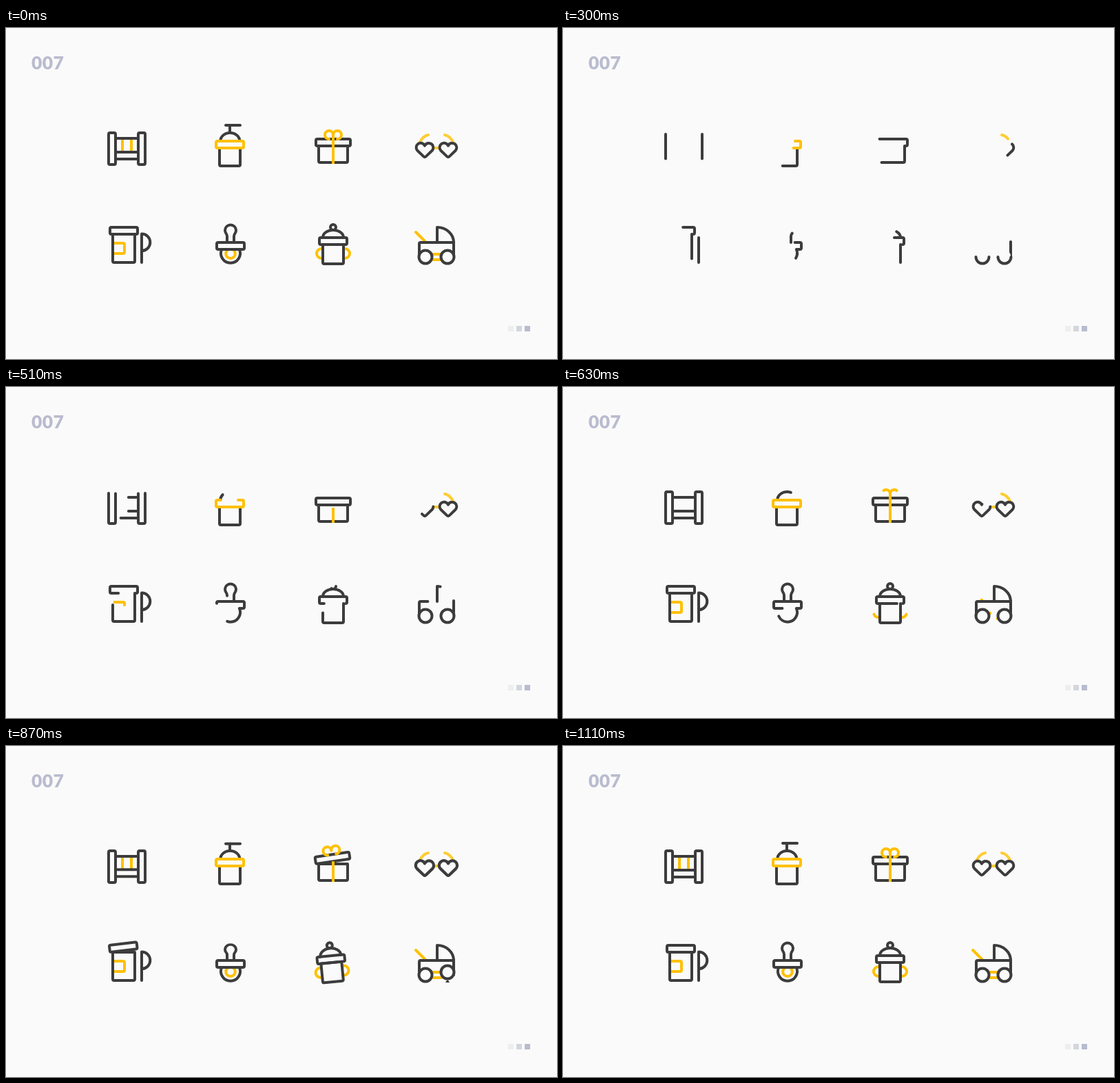
An HTML page that plays this animation: 800x480 px, repeating every 1.26 s.

```html
<!DOCTYPE html>
<html lang="en">
<head>
<meta charset="utf-8">
<title>Icon set 007</title>
<style>
  html, body { margin: 0; width: 100%; height: 100%; overflow: hidden; background: #fafafa; }
  svg { display: block; width: 100vw; height: 100vh; }
  text { font: 900 26.5px Lato, "Open Sans", sans-serif; letter-spacing: .4px; fill: #b9bccf; }
  path { fill: none; stroke-width: 4; stroke-linejoin: round; }
</style>
</head>
<body>
<svg id="stage" viewBox="0 0 800 480">
  <text x="37" y="59.5">007</text>
  <rect x="729" y="432" width="8" height="8" fill="#edeef0"/>
  <rect x="741" y="432" width="8" height="8" fill="#d3d6de"/>
  <rect x="753" y="432" width="8" height="8" fill="#b8bccf"/>
</svg>
<script>
const STEP = 30, LOOP = 1260;
const DARK = '#3c3c3d', GOLD = '#ffc000', PALE = '#ffcc33', PAPER = '#fafafa';
const stage = document.getElementById('stage');
const strokes = [];

function node(tag, parent, attrs = {}) {
  const el = document.createElementNS('http://www.w3.org/2000/svg', tag);
  for (const key in attrs) el.setAttribute(key, attrs[key]);
  return parent.appendChild(el);
}
const group = (parent = stage) => node('g', parent);

// A stroke that draws itself from step `start` over `span` steps.
function draw(parent, color, start, span, d, attrs = {}) {
  const el = node('path', parent, { d, stroke: color, pathLength: 1, ...attrs });
  strokes.push({ el, start, span, cap: attrs['stroke-linecap'] || 'round' });
  return el;
}
const mirror = axis => ({ transform: `matrix(-1 0 0 1 ${2 * axis} 0)` });
const butt = { 'stroke-linecap': 'butt' };

// Rounded box, drawn from the lower right corner upwards.
const lid = (x, y, w, h, inset = 2) =>
  `M${x + w - inset} ${y + h}H${x + w - 2}a2 2 0 0 0 2-2V${y + 2}a2 2 0 0 0-2-2H${x + 2}` +
  `a2 2 0 0 0-2 2V${y + h - 2}a2 2 0 0 0 2 2z`;

// Container, drawn from the upper right corner downwards.
const pot = (x, y, w, h) =>
  `M${x + w} ${y}V${y + h - 2}a2 2 0 0 1-2 2H${x + 2}a2 2 0 0 1-2-2V${y}z`;

const ring = (cx, cy, r) =>
  `M${cx + r} ${cy}a${r} ${r} 0 1 1 ${-2 * r} 0a${r} ${r} 0 1 1 ${2 * r} 0`;

const heart = (cx, x, y) =>
  `M${cx + x} ${y}A6.5 6.5 0 0 1 ${cx + 10.6} 177.8L${cx + 1.4} 186.6Q${cx} 187.8 ${cx - 1.4} 186.6` +
  `L${cx - 10.6} 177.8A6.5 6.5 0 1 1 ${cx} 170.6A6.5 6.5 0 0 1 ${cx + x} ${y}z`;

// Crib
const bars = [169, 182].map(x => ({ x, el: draw(stage, GOLD, 21, 5, `M${x} 160V180`, butt) }));
draw(stage, DARK, 14, 7, 'M192 160H159');
const rails = group();
draw(rails, DARK, 14, 7, 'M192 180H159');
draw(rails, DARK, 12, 6.5, 'M192 190H159');
const post = 'M149 154V196a2 2 0 0 0 2 2h6a2 2 0 0 0 2-2V154a2 2 0 0 0-2-2h-6a2 2 0 0 0-2 2z';
draw(stage, DARK, 5.83, 12.6, post);
draw(stage, DARK, 5.83, 12.6, post, mirror(175.5));

// Pump bottle
const stem = draw(stage, DARK, 22, 3, 'M325 151V141');
const head = draw(stage, DARK, 23, 3.5, 'M319 141H340');
draw(stage, DARK, 15, 9.4, 'M311.3 164a14 12 0 0 1 28 0');
draw(stage, DARK, 5.8, 10, pot(310, 174, 30, 26));
draw(stage, GOLD, 5.85, 15.2,
  'M337 164H343a2 2 0 0 1 2 2V172a2 2 0 0 1-2 2H307a2 2 0 0 1-2-2V166a2 2 0 0 1 2-2z');

// Gift
draw(stage, DARK, 5.7, 9.9, pot(454, 171, 42, 24));
const giftLid = group();
draw(giftLid, DARK, 5.7, 9.9, lid(450, 161, 50, 10));
const loop = 'M475 155a6 6 0 1 0-6 6';
draw(giftLid, GOLD, 17.5, 7.5, loop);
draw(giftLid, GOLD, 17.5, 7.5, loop, mirror(475));
const ribbon = draw(stage, GOLD, 14, 6, 'M475 197V153', butt);

// Glasses
const temple = 'M637 155Q645 156.5 650 167';
draw(stage, PALE, 5.2, 8, temple);
draw(stage, PALE, 21, 5, temple, mirror(625));
draw(stage, PALE, 13, 3, 'M631 174H619');
const lenses = [
  { cx: 608, el: draw(stage, DARK, 14, 9, heart(608, 12.3, 173.4), { style: `fill:${PAPER}` }) },
  { cx: 642, el: draw(stage, DARK, 7.5, 9, heart(642, 10, 168.4), { style: `fill:${PAPER}` }) }
];

// Jug
draw(stage, GOLD, 14, 6.5, 'M156 312H170a2 2 0 0 1 2 2V325a2 2 0 0 1-2 2H156', butt);
draw(stage, DARK, 5.8, 17, pot(155, 299, 32, 41));
draw(stage, DARK, 5.05, 11, 'M197 340V298.5a12.3 12.3 0 0 1 0 24.6');
const jugLid = group();
draw(jugLid, DARK, 5.7, 15.5, lid(151, 289, 40, 10));

// Pacifier
draw(stage, GOLD, 21, 5, 'M329.8 321.6A6.8 6.8 0 1 1 322.2 321.6');
draw(stage, DARK, 5.2, 20, 'M338.8 321A14 14 0 1 1 313.2 321');
const teat = group();
draw(teat, DARK, 7.5, 11,
  'M331 311V302q0-2 1.2-3.5A8 8 0 1 0 319.8 298.5q1.2 1.5 1.2 3.5V311');
draw(stage, DARK, 5, 20.7, lid(306, 311, 40, 10, 6));

// Sippy cup
const cup = group();
const ear = 'M460 334h-2a7 7 0 0 1 0-14h2';
draw(cup, GOLD, 18, 7.5, ear);
draw(cup, GOLD, 18, 7.5, ear, mirror(475));
draw(cup, DARK, 15, 5.5, ring(475, 289, 4));
draw(cup, DARK, 8, 7.5, 'M490 304a15 11 0 0 0-30 0');
draw(cup, DARK, 5.9, 18, pot(460, 314, 30, 28));
draw(cup, DARK, 5.9, 16.5, lid(455, 304, 40, 10));

// Pram
draw(stage, GOLD, 20.5, 5, 'M609 310L595 296');
draw(stage, GOLD, 20.5, 5, 'M619 328H632');
draw(stage, GOLD, 20.5, 5, 'M632 336H618');
draw(stage, DARK, 14, 6.5, 'M600 332V313a2 2 0 0 1 2-2H650');
draw(stage, DARK, 14, 6.5, 'M626 311V289A24 22 0 0 1 650 311');
draw(stage, DARK, 5, 4, 'M650 310V332');
const wheels = [609, 641].map(cx => ({
  cx, el: draw(stage, DARK, 6, 8, ring(cx, 332, 9.5), { style: `fill:${PAPER}` })
}));
const stone = node('path', stage, { d: 'M-3 343L-.8 339.6H.8L3 343z', style: `fill:${DARK}` });

const clamp = v => Math.min(1, Math.max(0, v));
const ease = v => { v = clamp(v); return v * v * (3 - 2 * v); };
const pulse = (f, from, peak, to) =>
  f < peak ? ease((f - from) / (peak - from)) : 1 - ease((f - peak) / (to - peak));
const move = (el, value) => el.setAttribute('transform', value);

function sway(f) {
  const keys = [[25, 0], [29, -5.6], [33, 6.8], [37, 0]];
  for (let i = 1; i < keys.length; i++) {
    const [f0, a] = keys[i - 1], [f1, b] = keys[i];
    if (f <= f1) return a + (b - a) * ease((f - f0) / (f1 - f0));
  }
  return 0;
}

function render(ms) {
  const f = Math.floor((ms % LOOP) / STEP);

  for (const { el, start, span, cap } of strokes) {
    const part = f < 2 ? 1 : clamp((f - start) / span);
    el.style.visibility = part > 0 ? 'visible' : 'hidden';
    el.setAttribute('stroke-linecap', cap);
    el.setAttribute('stroke-dasharray', part < 1 ? `${part} 2` : 'none');
  }

  const quick = pulse(f, 27, 32, 37), late = pulse(f, 28, 32, 37);

  const rise = 5.5 * late;
  move(rails, `translate(0 ${-rise})`);
  for (const { x, el } of bars) el.setAttribute('d', `M${x} 160V${180 - rise}`);

  move(head, `translate(0 ${rise})`);
  stem.setAttribute('d', `M325 151V${141 + rise}`);

  move(giftLid, `rotate(${-24 * quick} 450 171)`);
  ribbon.setAttribute('d', `M475 197V${153 + 40.5 * quick}`);
  move(jugLid, `rotate(${-19.5 * quick} 151 299)`);

  for (const { cx, el } of lenses) {
    move(el, `translate(${cx} 176.5) scale(${1 + .38 * late}) translate(${-cx} -176.5)`);
  }

  move(teat, `translate(0 311) scale(1 ${1 - .28 * quick}) translate(0 -311)`);
  move(cup, `rotate(${sway(f)} 475 342)`);

  const stoneX = 641 - 6.5 * (f - 29);
  stone.style.visibility = f >= 26 && f <= 36 ? 'visible' : 'hidden';
  move(stone, `translate(${stoneX} 0)`);
  for (const { cx, el } of wheels) {
    const gap = (stoneX - cx) / 6;
    const lift = f >= 26 ? 4 * Math.max(0, 1 - gap * gap) : 0;
    move(el, `translate(0 ${-lift})`);
  }
}

const begin = performance.now();
function tick() {
  render(performance.now() - begin);
  requestAnimationFrame(tick);
}
tick();
</script>
</body>
</html>
```
